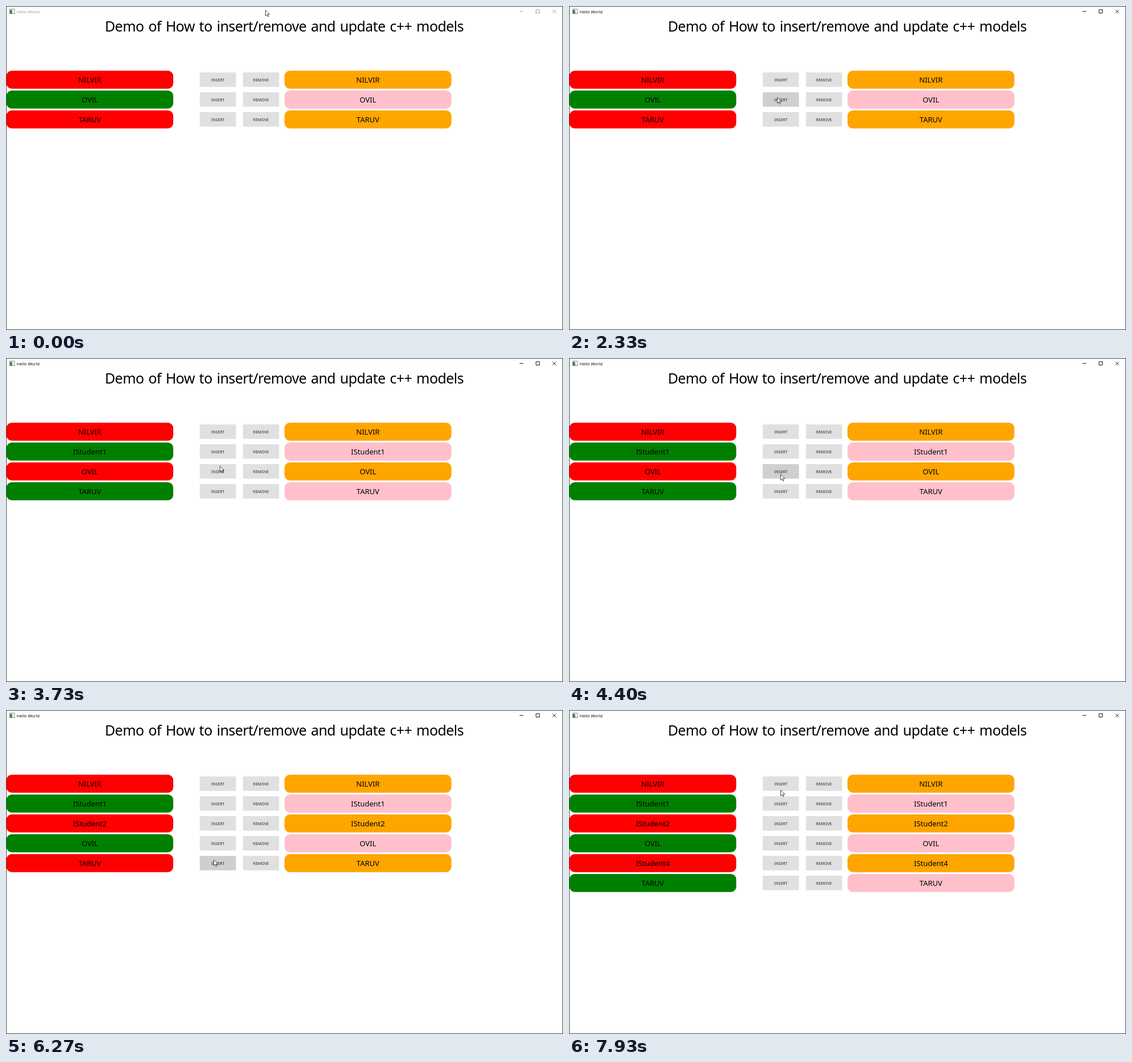
An HTML page that plays this animation: 980 px wide and 571 px high, repeating every 8 s.

```html
<!DOCTYPE html>
<html lang="en">
<head>
<meta charset="utf-8">
<title>Hello World</title>
<style>
  html, body { margin: 0; width: 100%; height: 100%; overflow: hidden; background: #fff; }
  svg { display: block; width: 100%; height: 100%; }
  text { font-family: "Noto Sans", sans-serif; }
  .caption { font: 7.4px "Open Sans", sans-serif; }
  .heading { font-size: 25px; letter-spacing: -.58px; word-spacing: 2px; text-anchor: middle; }
  .name { font-size: 20.4px; text-anchor: middle; }
  .label { font-size: 10.8px; fill: #26282a; text-anchor: middle; }
  #chrome { color: #999; }
  #chrome.active { color: #000; }
</style>
</head>
<body>
<svg viewBox="0 0 980 571">
  <g id="chrome">
    <rect x=".5" y=".5" width="979" height="570" fill="#fff" stroke="#4a4a4a"/>
    <rect x="6.5" y="5.5" width="8.5" height="8" fill="#fff" stroke="#888"/>
    <rect x="7" y="7" width="4" height="6" fill="#4d7f70"/>
    <text class="caption" x="18.7" y="12.7" fill="currentColor">Hello World</text>
    <path d="M903.5 9.5h6.5M932.5 6.5h6v6h-6zM961.7 6.7l6 6m0-6l-6 6" fill="none" stroke="currentColor" stroke-width=".9"/>
  </g>
  <text class="heading" x="489.5" y="45">Demo of How to insert/remove and update c++ models</text>
  <g id="rows" transform="scale(.63636)"></g>
  <path id="pointer" d="M0 0v10.2l2.4-2.2 1.6 3.8 1.6-.7-1.6-3.6h3.3z" fill="#fff" stroke="#222" stroke-width=".8" stroke-linejoin="round"/>
</svg>
<script>
const LOOP = 8000, STEP = 200 / 3;
const BASE = ["NILVIR", "OVIL", "TARUV"];
const FILLS = [["#f00", "#ffa500"], ["#008000", "#ffc0cb"]];

const CLICKS = [
  { row: 1, down: 2330, up: 2730 },
  { row: 2, down: 4270, up: 4530 },
  { row: 4, down: 6270, up: 6400 }
];

// Each move eases out to x, y; bow bends it sideways
const HOME = { x: 456.5, y: 7 };
const MOVES = [
  { from: 67, to: 667, x: 353.5, y: 150, bow: 0 },
  { from: 800, to: 1133, x: 368, y: 149, bow: 0 },
  { from: 1133, to: 1733, x: 366.5, y: 161, bow: 4 },
  { from: 3333, to: 4200, x: 372.5, y: 205, bow: 6 },
  { from: 5533, to: 6133, x: 365.5, y: 264, bow: -5 },
  { from: 7067, to: 7933, x: 372.5, y: 141, bow: -8 }
];

const byId = id => document.getElementById(id);

function add(parent, tag, attrs, text = "") {
  const el = document.createElementNS("http://www.w3.org/2000/svg", tag);
  for (const key in attrs) el.setAttribute(key, attrs[key]);
  el.textContent = text;
  return parent.appendChild(el);
}

function addBar(g, x, fill) {
  const width = 461.4;
  add(g, "rect", { x, width, height: 50, rx: 15, fill });
  return add(g, "text", { class: "name", x: x + width / 2, y: 32.8 });
}

function addButton(g, x, label) {
  const box = add(g, "rect", { x, y: 5, width: 100, height: 40 });
  add(g, "text", { class: "label", x: x + 50, y: 29.3 }, label);
  return box;
}

function addRow(i) {
  const g = add(byId("rows"), "g", { transform: `translate(0 ${179 + 55 * i})` });
  const [left, right] = FILLS[i % 2];
  const names = [addBar(g, 1, left), addBar(g, 770, right)];
  const [insert, remove] = [addButton(g, 535.7, "INSERT"), addButton(g, 655, "REMOVE")];
  remove.setAttribute("fill", "#e0e0e0");
  return { g, names, insert };
}

const rows = Array.from({ length: BASE.length + CLICKS.length }, (_, i) => addRow(i));

function pointerAt(t) {
  let { x, y } = HOME;
  for (const move of MOVES) {
    const k = Math.min(1, Math.max(0, (t - move.from) / (move.to - move.from)));
    const ease = Math.sin(k * Math.PI / 2);
    x += (move.x - x) * ease + move.bow * Math.sin(k * Math.PI);
    y += (move.y - y) * ease;
  }
  return [x, y];
}

function render(t) {
  const list = [...BASE];
  let pressed = -1;
  for (const { row, down, up } of CLICKS) {
    if (t >= up) list.splice(row, 0, "IStudent" + row);
    else if (t >= down) pressed = row;
  }
  rows.forEach(({ g, names, insert }, i) => {
    g.style.display = i < list.length ? "" : "none";
    for (const el of names) el.textContent = list[i] || "";
    insert.setAttribute("fill", i === pressed ? "#cfcfcf" : "#e0e0e0");
  });
  byId("chrome").classList.toggle("active", t >= CLICKS[0].down);
  // The pointer is sampled 15 times a second
  const tick = Math.floor((t + 4) / STEP) * STEP;
  byId("pointer").setAttribute("transform", `translate(${pointerAt(tick)})`);
}

const start = performance.now();
function loop() {
  render((performance.now() - start) % LOOP);
  requestAnimationFrame(loop);
}
loop();
</script>
</body>
</html>
```
